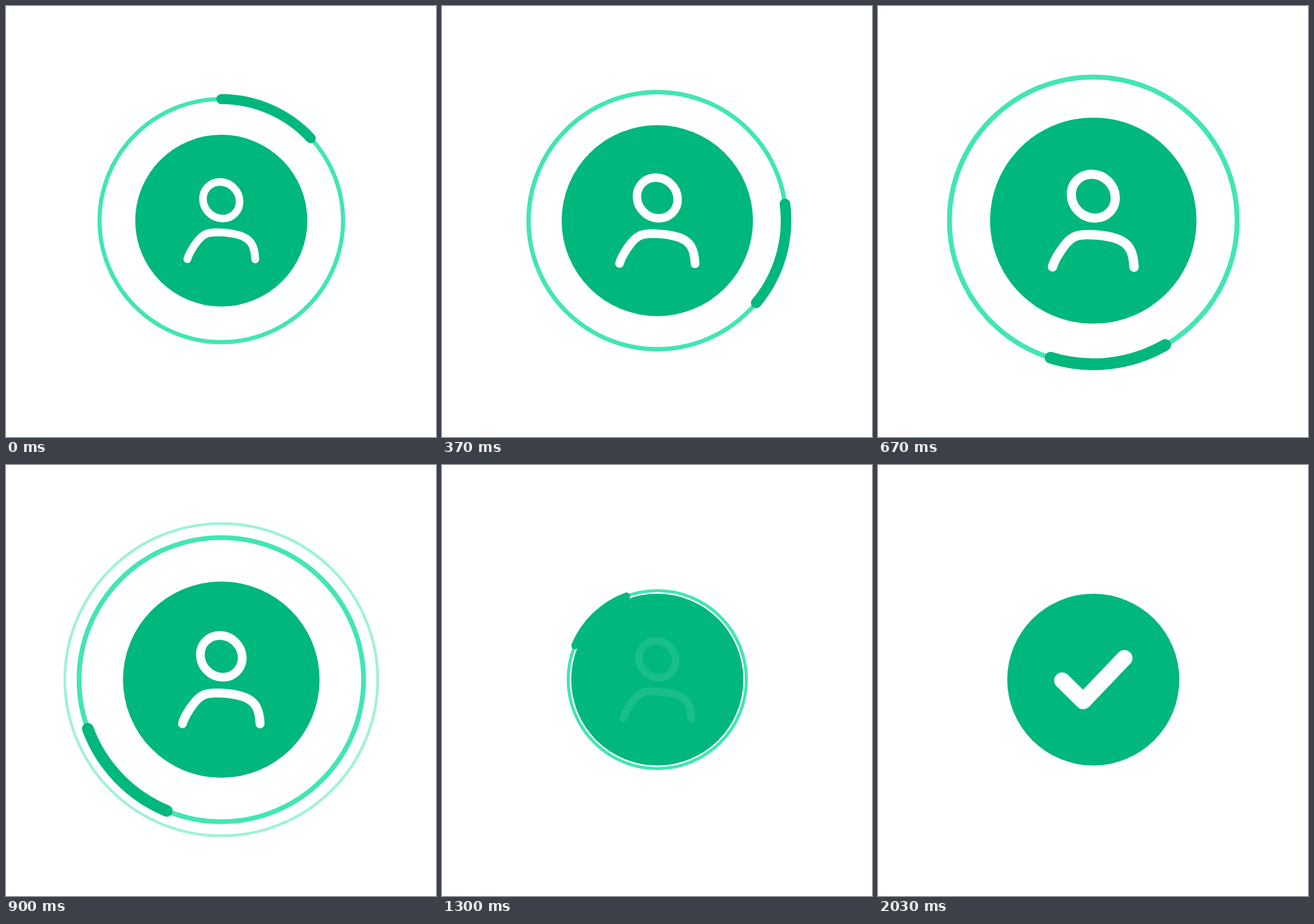
Recreate the animation shown at these times as an HTML page with a canvas. Size 747 px wide and 750 px high, loop 2.16 s.

```html
<!DOCTYPE html>
<html lang="en">
<head>
<meta charset="utf-8">
<title>User verified</title>
<style>
  html, body { margin: 0; width: 100%; height: 100%; overflow: hidden; background: #fff; }
  canvas { display: block; }
</style>
</head>
<body>
<canvas id="stage" width="747" height="750"></canvas>
<script>
const ctx = document.getElementById('stage').getContext('2d');
const LOOP = 2160, FPS = 30;
const GREEN = '#00b77e', MINT = '#41e6b3', WHITE = '#fff';
const TAU = Math.PI * 2;

const shoulders = new Path2D(
  'M-59 67C-56 56-41 30.3-28 23.8C-18 18.3 12 19.8 31 25.3C53 31.8 58 46 59 67.5');
const CHECK = [[-54, 1.5], [-17.5, 37.5], [54, -37.5]];

const progress = (t, from, to) => Math.min(1, Math.max(0, (t - from) / (to - from)));
const smooth = (t, from, to) => {
  const p = progress(t, from, to);
  return p * p * (3 - 2 * p);
};

function stroke(color, width, path) {
  ctx.strokeStyle = color;
  ctx.lineWidth = width;
  path ? ctx.stroke(path) : ctx.stroke();
}

function ring(radius, width, color, start = 0, sweep = TAU) {
  ctx.beginPath();
  ctx.arc(0, 0, radius, start, start + sweep);
  stroke(color, width);
}

// A thin ring that shoots outwards, slows down and fades.
function halo(t, from, to, r0, r1, power, fadeFrom) {
  if (t < from || t >= to) return;
  const out = 1 - (1 - progress(t, from, to)) ** power;
  ctx.globalAlpha = 0.5 * (1 - progress(t, fadeFrom, to));
  ring(r0 + (r1 - r0) * out, 4.8, MINT);
  ctx.globalAlpha = 1;
}

// Grows past its size, settles, then closes in on the disc.
function orbit(t) {
  if (t > 1375) return;
  const r = 211.5 + 41.5 * smooth(t, 270, 540) - 4.5 * smooth(t, 540, 740)
    - 99.5 * smooth(t, 865, 1375);
  ring(r, r * 0.034, MINT);
  ring(r, r * 0.082, GREEN, TAU * (t / 1600 - 0.25), TAU * 47.3 / 360);
}

function person(alpha) {
  ctx.globalAlpha = alpha;
  ctx.beginPath();
  ctx.ellipse(0, -35.5, 33, 30.6, TAU / 8, 0, TAU);
  stroke(WHITE, 13.2);
  stroke(WHITE, 13.6, shoulders);
  ctx.globalAlpha = 1;
}

function check(amount) {
  if (!amount) return;
  const [a, b, c] = CHECK;
  const first = Math.hypot(b[0] - a[0], b[1] - a[1]);
  const second = Math.hypot(c[0] - b[0], c[1] - b[1]);
  const drawn = amount * (first + second);
  const lineTo = (p, q, k) => ctx.lineTo(p[0] + (q[0] - p[0]) * k, p[1] + (q[1] - p[1]) * k);
  ctx.beginPath();
  ctx.moveTo(...a);
  lineTo(a, b, Math.min(1, drawn / first));
  if (drawn > first) lineTo(b, c, (drawn - first) / second);
  stroke(WHITE, 28);
}

function draw(t) {
  ctx.setTransform(1, 0, 0, 1, 0, 0);
  ctx.fillStyle = WHITE;
  ctx.fillRect(0, 0, 747, 750);
  ctx.translate(374, 373.5);
  ctx.lineCap = ctx.lineJoin = 'round';

  halo(t, 630, 1050, 245, 273, 3, 910);
  halo(t, 1430, 2030, 148, 198, 4, 1650);
  orbit(t);

  const scale = 1 + 0.2 * (smooth(t, 0, 680) - smooth(t, 680, 1300));
  ctx.scale(scale, scale);
  ctx.beginPath();
  ctx.arc(0, 0, 149.5, 0, TAU);
  ctx.fillStyle = GREEN;
  ctx.fill();

  person(1 - progress(t, 1000, 1333));
  check(smooth(t, 1333, 1580));
}

const begin = performance.now();
function tick() {
  const t = (performance.now() - begin) % LOOP;
  // The motion advances in steps of one thirtieth of a second.
  draw(Math.floor((t + 4) * FPS / 1000) * 1000 / FPS);
  requestAnimationFrame(tick);
}
tick();
</script>
</body>
</html>
```
